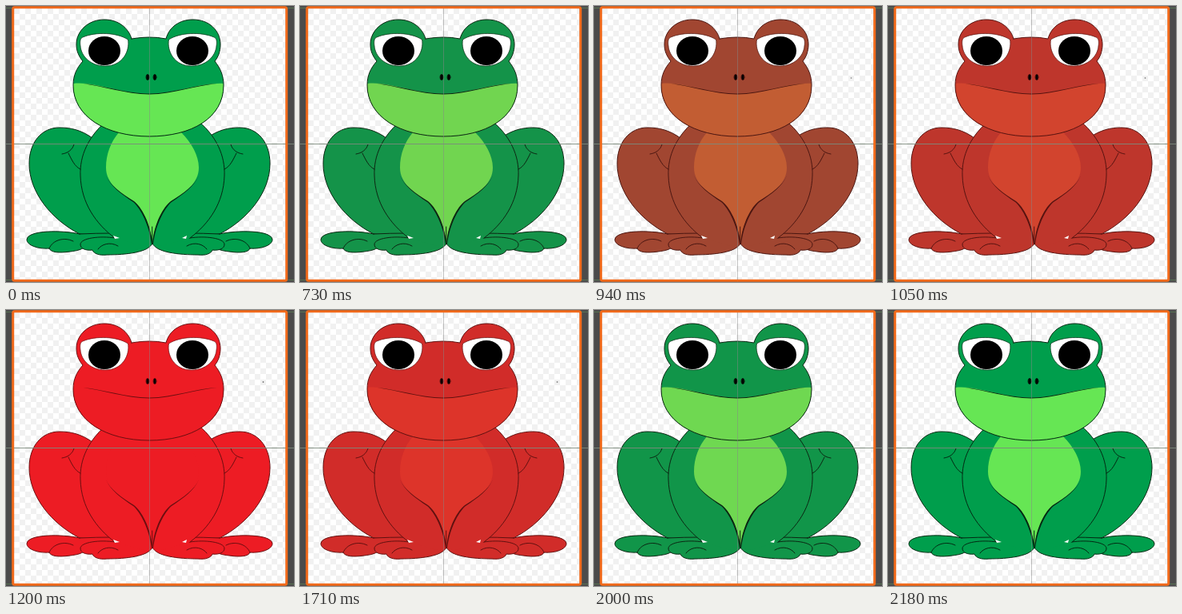
Write an HTML page that moves like this. It is 360 by 345 pixels and loops after 3320 ms.

```html
<!DOCTYPE html>
<html lang="en">
<head>
<meta charset="utf-8">
<title>Frog colour fade</title>
<style>
  html, body { margin: 0; width: 100%; height: 100%; overflow: hidden; background: #4b4b4b; }
  svg { display: block; }
  .skin { fill: var(--skin); }
  .pale { fill: var(--pale); }
  .ink { stroke: var(--ink); stroke-width: 1; stroke-linecap: round; stroke-linejoin: round; }
  .line { fill: none; }
  .taper { fill: var(--ink); }
</style>
</head>
<body>
<svg width="360" height="345" viewBox="0 0 360 345">
  <defs>
    <pattern id="check" width="14" height="14" x="10" y="3" patternUnits="userSpaceOnUse">
      <path fill="#fff" d="M0 0h14v14H0z"/>
      <path fill="#f1f1f1" d="M0 0h7v7H0zM7 7h7v7H7z"/>
    </pattern>
    <path id="head" d="M157 41Q180 37 200 41C204 26 217 17 234 17C254 17 268 31 268 48C268 57 265 64 261 69C268 78 272 87 272 99C272 140 232 163 179 163C125 163 84 138 84 99C84 87 88 78 96 69C91 63 88 56 88 48C88 31 103 17 123 17C140 17 153 27 157 41Z"/>
    <clipPath id="face"><use href="#head"/></clipPath>

    <g id="hind" class="skin ink">
      <path d="M108 165C94 155 81 152 67 152C44 152 29 171 29 197C29 233 57 267 92 285L130 287L130 180Z"/>
      <path d="M92 285C70 280 27 280 26 292C26 299 40 304 54 303C56 308 66 309 80 307C89 306 95 304 97 302L135 291V284Q112 284 92 285Z"/>
      <path class="line" d="M54 303C58 293 72 288 84 294"/>
    </g>
    <g id="fore" class="skin ink">
      <path d="M136 290C118 287 93 290 93 298C93 303 99 306 108 305C110 310 117 312 126 311C150 311 178 308 182.5 297L170 280Z"/>
      <path class="line" d="M115 304C119 298 130 294 140 300"/>
    </g>
    <path id="crease" class="ink line" d="M70 185C77 184 83 180 85 173M78 184C82 192 86 201 93 204"/>
    <path id="fold" class="taper" d="M125 212C130 224 144 234 160 244C169 251 181 271 183 298H182C179 273 168 253 159.3 245.2C144 235 130 225 125 212Z"/>
    <g id="eye">
      <path fill="#fff" stroke="var(--ink)" stroke-width=".7" d="M93 50C92 44 93 40 96 39C112 32 139 33 152.5 42C155 56 146 75 124 75C106 75 94 63 93 50Z"/>
      <ellipse cx="123" cy="56" rx="20" ry="18"/>
    </g>
  </defs>

  <path fill="url(#check)" d="M8 1h343v343H8z"/>
  <path stroke="#597454" d="M0 2.5h8M352 2.5h8M0 342.5h8M352 342.5h8"/>

  <use href="#hind"/>
  <use href="#hind" transform="matrix(-1 0 0 1 359 0)"/>
  <use href="#fore"/>
  <use href="#fore" transform="matrix(-1 0 0 1 366 0)"/>
  <path class="skin" d="M130 140C102 162 92 188 93 212C94 246 112 272 136 290L170 300L183 298L196 300L230 290C254 272 272 246 273 212C274 188 264 162 236 140Z"/>
  <path class="ink line" d="M130 140C102 162 92 188 93 212C94 246 112 272 136 290M236 140C264 162 274 188 273 212C272 246 254 272 230 290"/>
  <path fill="#fff" d="M134 287l8 3-6 1zM226 287l-6 3 5 1z"/>
  <path class="pale" d="M141 158C131 170 125 185 125 202C125 222 143 234 160 244.5C169 252 180 272 183 296C186 272 197 252 206 244.5C223 234 241 222 241 202C241 187 232 171 219 158Z"/>
  <use href="#fold"/>
  <use href="#fold" transform="matrix(-1 0 0 1 366 0)"/>
  <path class="ink" d="M182.7 276V298"/>
  <use href="#crease"/>
  <use href="#crease" transform="matrix(-1 0 0 1 366 0)"/>

  <use href="#head" class="skin"/>
  <path class="pale" clip-path="url(#face)" d="M84 97C110 94 140 109 179 110C215 109 245 95 273 97V165H84Z"/>
  <path class="taper" d="M96 97C120 99 150 109 179 109.6C210 109 238 98 264 97C238 99 210 110 179 110.6C150 110 120 100 96 97Z"/>
  <use href="#head" class="ink line"/>
  <use href="#eye"/>
  <use href="#eye" transform="matrix(-1 0 0 1 356 0)"/>
  <g class="ink"><ellipse cx="177" cy="89" rx="2" ry="3.6"/><ellipse cx="186" cy="89" rx="2" ry="3.6"/></g>
  <circle id="speck" cx="321.5" cy="90" r=".9" fill="#777"/>

  <path stroke="#7c8a7c" stroke-opacity=".9" d="M0 172.5h360"/>
  <path stroke="#858585" stroke-opacity=".5" d="M179.5 0v345"/>
  <rect x="8.7" y="1.7" width="342" height="341.5" rx="2" fill="none" stroke="#f26a1b" stroke-width="3"/>
</svg>
<script>
  const LOOP = 3320;
  // [start in ms, amount of red]
  const steps = [
    [0, 0], [730, .085], [810, .3], [880, .51], [940, .68], [990, .8], [1060, .9], [1130, .96], [1200, 1],
    [1710, .88], [1780, .57], [1850, .3], [1920, .15], [1990, .07], [2050, .035], [2110, .015], [2180, 0]
  ];
  const skin = [0, 158, 76], pale = [102, 230, 84], red = [237, 28, 36];
  const root = document.documentElement.style;
  const speck = document.getElementById('speck');
  const mix = (a, b, k) => `rgb(${a.map((v, i) => Math.round(v + (b[i] - v) * k))})`;

  function draw() {
    const t = performance.now() % LOOP;
    const k = steps.findLast(([start]) => start <= t)[1];
    root.setProperty('--skin', mix(skin, red, k));
    root.setProperty('--pale', mix(pale, red, k));
    root.setProperty('--ink', mix([4, 40, 18], [108, 14, 16], k));
    speck.setAttribute('opacity', k);
    requestAnimationFrame(draw);
  }
  draw();
</script>
</body>
</html>
```
